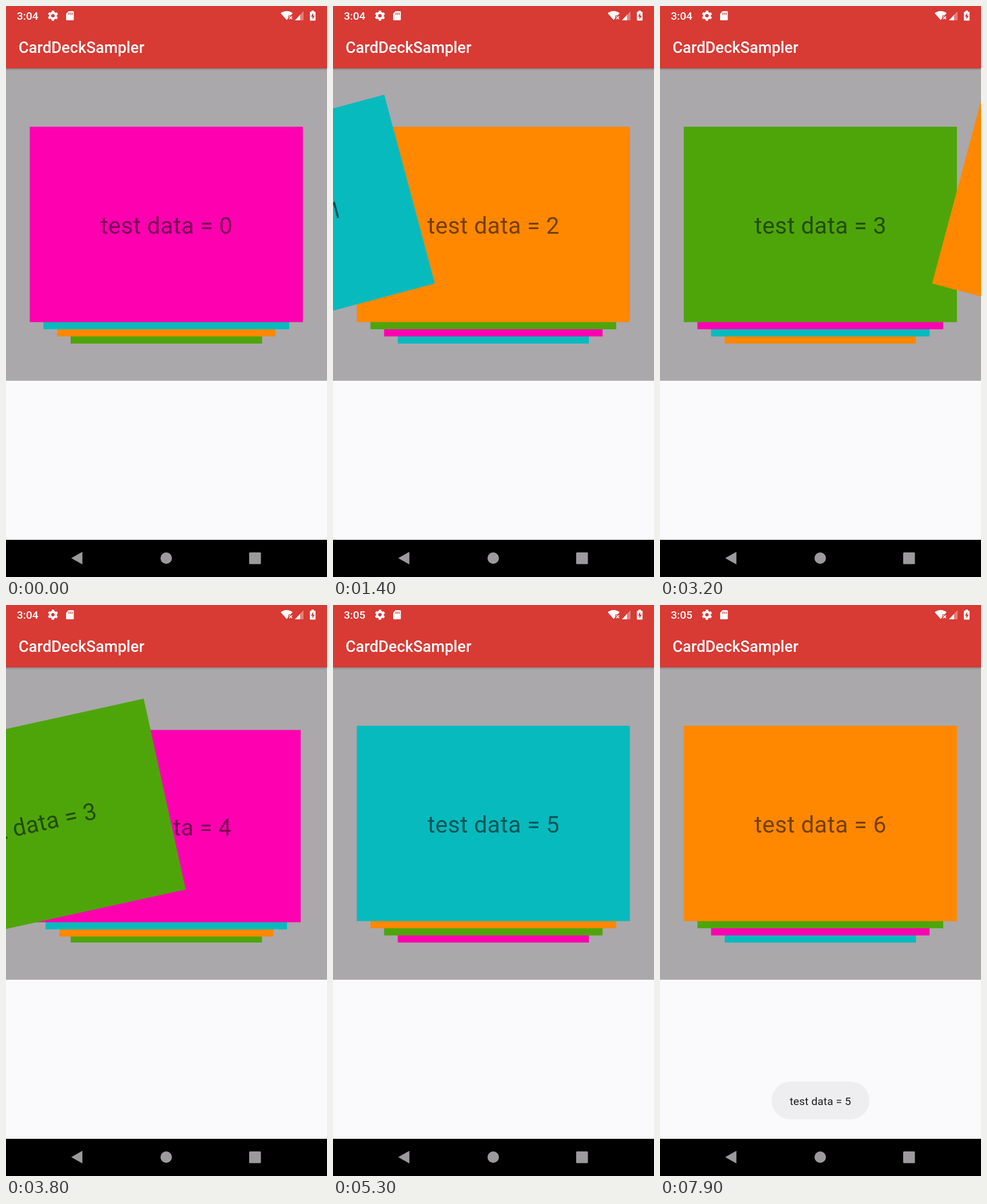
An HTML page for the animation above (8 s loop, 561 by 998 pixels).

```html
<!DOCTYPE html>
<html lang="en">
<head>
<meta charset="utf-8">
<title>Card stack</title>
<style>
  html, body { margin: 0; width: 100%; height: 100%; overflow: hidden; background: #faf9fc; }
  svg { display: block; width: 100%; height: 100%; font-family: Roboto, sans-serif; }
  .label { font-size: 40.9px; letter-spacing: .35px; text-anchor: middle; fill: #000; fill-opacity: .54; }
</style>
</head>
<body>
<svg viewBox="0 0 561 998">
  <defs>
    <linearGradient id="shade" x2="0" y2="1">
      <stop stop-opacity=".2"/>
      <stop offset="1" stop-opacity="0"/>
    </linearGradient>
  </defs>
  <rect width="561" height="998" fill="#faf9fc"/>
  <rect y="109" width="561" height="546" fill="#aaa8ab"/>
  <rect y="109" width="561" height="4" fill="url(#shade)"/>
  <g id="deck"></g>

  <rect width="561" height="109" fill="#d83a34"/>
  <g fill="#fff" font-weight="500">
    <text id="clock" x="19" y="24" font-size="19.1"></text>
    <text x="22" y="81.5" font-size="27.27">CardDeckSampler</text>
  </g>

  <!-- status icons -->
  <g fill="none" stroke="#fff">
    <circle cx="82" cy="17" r="5" stroke-width="4"/>
    <circle cx="82" cy="17" r="7.6" stroke-width="2.6" stroke-dasharray="4.2 3.76" stroke-dashoffset="-1.88"/>
  </g>
  <path fill="#fff" d="M109.5 9H117q1.5 0 1.5 1.5v13q0 1.5-1.5 1.5h-10.5q-1.5 0-1.5-1.5v-10z"/>
  <path stroke="#d83a34" stroke-width="1.3" d="M110 11.5v4M112.800 11.500v4M115.600 11.500v4"/>
  <path fill="#fff" d="M480 12.500Q490.500 5 501 12.500L497.500 16.500H493.500V21L490.500 24.500z"/>
  <path stroke="#fff" stroke-width="1.700" d="M495 18l5 5M500 18l-5 5"/>
  <path fill="#fff" fill-opacity=".35" d="M505 25H520V9z"/>
  <path fill="#fff" d="M505 25H514V15.500z"/>
  <path fill="#fff" d="M534 8h4v2h2q1 0 1 1v13.500q0 1-1 1h-8q-1 0-1-1V11q0-1 1-1h2z"/>
  <path fill="#d83a34" d="M537 12l-4 6.500h2.500V23.500l4-6.500H537z"/>

  <g id="toast">
    <rect x="195" y="833" width="171" height="66" rx="33" fill="#eeedf0"/>
    <text x="280.300" y="874" font-size="19.1" letter-spacing=".12" text-anchor="middle" fill="#1c1c1e">test data = 5</text>
  </g>

  <!-- navigation bar -->
  <rect y="933" width="561" height="65" fill="#000"/>
  <g fill="#9c9a9d">
    <path d="M114 965L133.500 954V976z"/>
    <circle cx="280" cy="965" r="10"/>
    <rect x="425" y="955" width="20.500" height="20.500" rx="1.500"/>
  </g>
</svg>
<script>
const LOOP = 8000, STEP = 100;
const W = 477.3, H = 341.5, CX = 280.2, CY = 381.75, BOTTOM = CY + H / 2;
const REACH = 280.5, TILT = .0525, MAX_TILT = 15;
const COLORS = ['#ff00b0', '#07babe', '#ff8800', '#4ea50a'];

// start, first offset, held offset, release time
const SWIPES = [
  [200, 90, 375, 700],
  [1300, -90, -377, 1800],
  [2700, 87, 376, 3200],
  [3800, -236, -329, 4200],
  [4800, 159, 350, 5200],
  [6900, 0, -318, 7400]
];

const $ = id => document.getElementById(id);
const clamp = (v, lo, hi) => Math.max(lo, Math.min(hi, v));

function add(parent, tag, attrs) {
  const node = document.createElementNS('http://www.w3.org/2000/svg', tag);
  for (const key in attrs) node.setAttribute(key, attrs[key]);
  return parent.appendChild(node);
}

// five cards, back to front
const cards = Array.from({ length: 5 }, () => {
  const g = add($('deck'), 'g', {});
  const face = add(g, 'rect', { x: -W / 2, y: -H / 2, width: W, height: H });
  const label = add(g, 'text', { class: 'label', x: .2, y: 16.5 });
  return { g, face, label };
}).reverse();

function deckState(t) {
  let top = 0;
  for (const [start, first, held, release] of SWIPES) {
    if (t < start) break;
    if (t < start + STEP) return { top, dx: first };
    if (t < release) return { top, dx: held };
    if (t < release + STEP) return { top, dx: Math.sign(held) * 470 };
    top++;
  }
  return { top, dx: 0 };
}

function render(ms) {
  const t = Math.floor(ms % LOOP / STEP) * STEP;
  const { top, dx } = deckState(t);
  const progress = Math.min(1, Math.abs(dx) / REACH);

  cards.forEach(({ g, face, label }, k) => {
    const n = top + k;
    face.setAttribute('fill', COLORS[n % COLORS.length]);
    label.textContent = 'test data = ' + n;
    if (k === 0) {
      const tilt = clamp(dx * TILT, -MAX_TILT, MAX_TILT);
      g.setAttribute('transform', `translate(${CX + dx} ${CY}) rotate(${tilt})`);
    } else {
      const level = Math.min(3, k - progress), scale = 1 - .1 * level;
      const y = BOTTOM + 12.5 * level - H / 2 * scale;
      g.setAttribute('transform', `translate(${CX} ${y}) scale(${scale})`);
    }
  });

  $('clock').textContent = t < 4900 ? '3:04' : '3:05';
  $('toast').setAttribute('opacity', clamp(((t - 5900) / STEP + 1) / 6, 0, 1));
}

const origin = performance.now();
function tick() {
  render(performance.now() - origin);
  requestAnimationFrame(tick);
}
tick();
</script>
</body>
</html>
```
